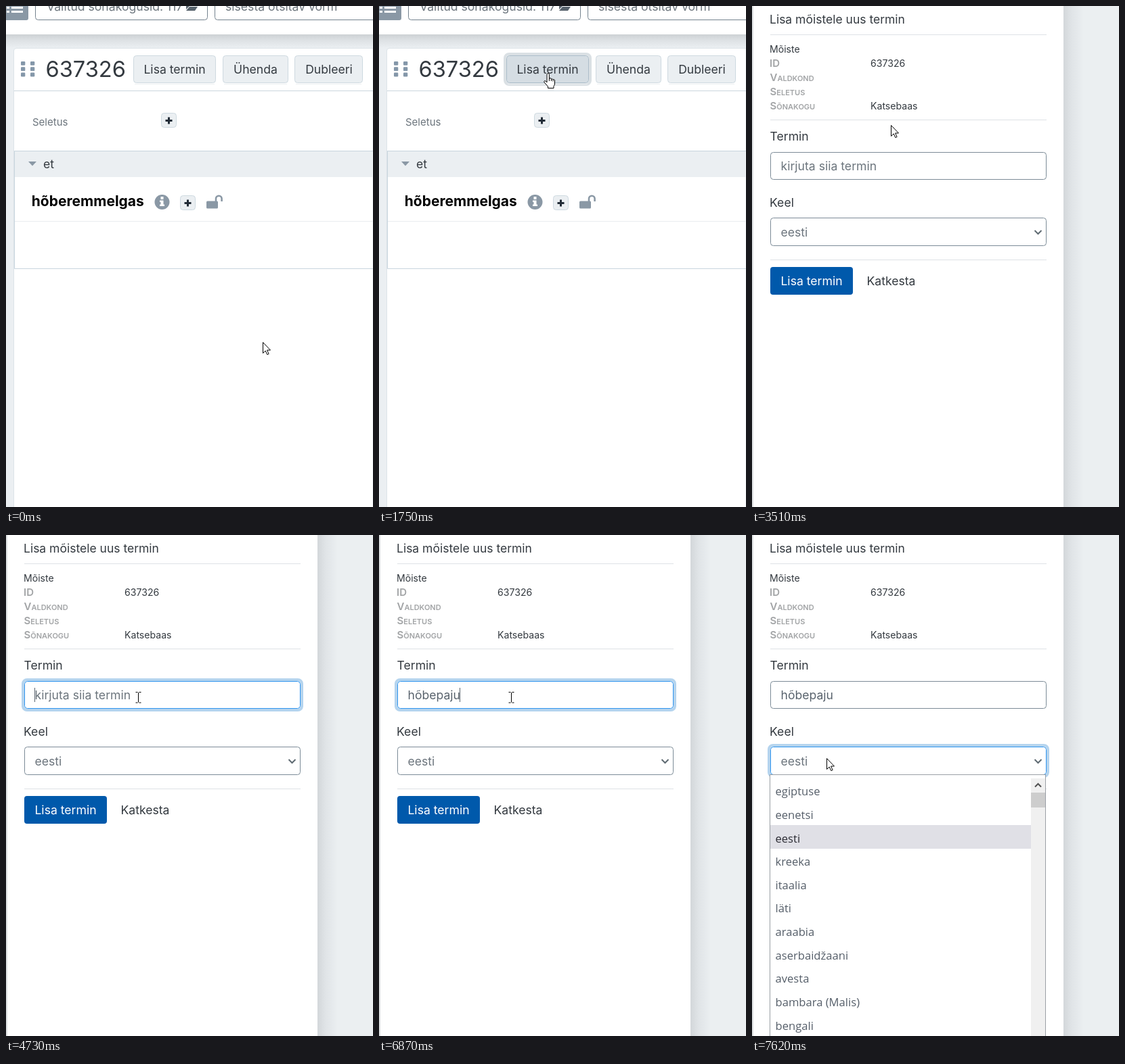
Write an HTML page that moves like this. It is 542 by 741 pixels and loops after 8 s.

```html
<!DOCTYPE html>
<html lang="et">
<head>
<meta charset="utf-8">
<title>Lisa termin</title>
<style>
  html, body { margin: 0; width: 100%; height: 100%; overflow: hidden; background: #ebeff2; }
  svg { display: block; width: 542px; height: 741px; font: 17.6px Inter, sans-serif; fill: #343a40; }
  .muted { fill: #6c757d; }
  .small { font-size: 14.1px; }
  .label { font-size: 15px; font-weight: 600; font-variant: small-caps; fill: #a2a4a6; }
  .mid { text-anchor: middle; }
  .icon { fill: #8a98a5; }
  .btn { fill: #ebeff2; stroke: #ced9e0; }
  .rule { stroke: #dee2e6; }
  .field { fill: #fff; stroke: #7c8b97; }
  .ring { fill: none; stroke: #b5d4ee; stroke-width: 4; }
  .list { font: 16.6px "Open Sans", sans-serif; fill: #555e69; }
</style>
</head>
<body>
<svg viewBox="0 0 542 741">
  <defs>
    <linearGradient id="below" x2="0" y2="1">
      <stop stop-color="#cdd1d4"/><stop offset=".45" stop-color="#dee2e5"/><stop offset="1" stop-color="#ebeff2"/>
    </linearGradient>
    <linearGradient id="beside">
      <stop stop-color="#d3d7da"/><stop offset=".4" stop-color="#e0e4e7"/><stop offset="1" stop-color="#ebeff1"/>
    </linearGradient>
    <g id="plus">
      <rect class="btn" x="-11" y="-11" width="22" height="21" rx="4"/>
      <path d="M-5 0H5M0-5V5" stroke="#212b36" stroke-width="3"/>
    </g>
  </defs>

  <g id="page">
    <rect width="542" height="741" fill="#ebeff2"/>
    <rect y="42" width="542" height="20" fill="url(#below)"/>
    <rect width="542" height="42" fill="#fff"/>
    <rect x="-6" y="-20" width="39" height="41" rx="3" class="icon"/>
    <path d="M1 2.500h4M1 8.500h4M8 2.500h17M8 8.500h17" stroke="#fff" stroke-width="3"/>
    <g fill="#fff" stroke="#74828e">
      <rect x="43.500" y="-20.500" width="254" height="41" rx="4"/>
      <rect x="308.500" y="-20.500" width="300" height="41" rx="4"/>
    </g>
    <text class="muted" x="60" y="7">Valitud sõnakogusid: 117</text>
    <path d="M266 5V-4h13v4h-8zM266 7l5-6h12l-4 6z" fill="#58636d"/>
    <text class="muted" x="324" y="7">sisesta otsitav vorm</text>

    <path d="M11.500 741V67q0-4.500 4.500-4.500H542V741" fill="#fff" stroke="#dce3e8"/>
    <g id="grip" fill="#8497a9"></g>
    <text x="58.500" y="105" font-size="32.600">637326</text>
    <rect id="hoverRing" class="ring" x="186" y="71" width="126" height="45" rx="6" style="stroke:#dae0e4"/>
    <path d="M190 115.500h118M322 115.500h93M428 115.500h97" stroke="#eceff1"/>
    <rect id="addButton" class="btn" x="188.500" y="73.500" width="121" height="40" rx="4"/>
    <rect class="btn" x="320.500" y="73.500" width="96" height="40" rx="4"/>
    <rect class="btn" x="426.500" y="73.500" width="100" height="40" rx="4"/>
    <g class="mid">
      <text x="249" y="100">Lisa termin</text>
      <text x="368.500" y="100">Ühenda</text>
      <text x="477" y="100">Dubleeri</text>
    </g>
    <path d="M12 125.500H542" stroke="#cbd6dd"/>
    <text class="muted" x="39" y="177" font-size="15">Seletus</text>
    <use href="#plus" x="240.500" y="169.500"/>

    <rect x="12" y="214" width="530" height="39" fill="#ebeff2"/>
    <path d="M542 214.500H12.500V388.500H542" fill="none" stroke="#c8d5de"/>
    <path d="M13 318.500H542" stroke="#e9edf0"/>
    <path class="icon" d="M33 230h12l-6 6.500z"/>
    <text x="55" y="240">et</text>
    <text x="37.800" y="296" font-size="21" font-weight="700" fill="#000">hõberemmelgas</text>
    <circle class="icon" cx="230.500" cy="290" r="11"/>
    <path d="M227 287.500h5.500v6h1.500v2.500h-7v-2.500h1.500v-3.500H227zM228.500 282h4v4h-4z" fill="#fff"/>
    <use href="#plus" x="268.500" y="291.500"/>
    <rect class="icon" x="296" y="288.500" width="17" height="11" rx="1.500"/>
    <path d="M310 289v-4a4.300 4.300 0 0 1 8.600 0v4" fill="none" stroke="#8a98a5" stroke-width="2.600"/>
  </g>

  <g id="panel">
    <rect width="542" height="741" fill="#ebeff1"/>
    <rect width="2" height="741" fill="#dadddf"/>
    <rect x="460" width="30" height="741" fill="url(#beside)"/>
    <rect x="2" width="458" height="741" fill="#fff"/>
    <path class="rule" d="M27 42.500H435M27 168.500H435M27 375.500H435"/>
    <text x="26" y="26" font-size="17.500">Lisa mõistele uus termin</text>
    <g class="small">
      <text x="26" y="69">Mõiste</text>
      <text x="175" y="90">637326</text>
      <text x="175" y="153">Katsebaas</text>
    </g>
    <g class="label">
      <text x="26" y="90">ID</text>
      <text x="26.500" y="111">Valdkond</text>
      <text x="26.500" y="132">Seletus</text>
      <text x="26.500" y="153">Sõnakogu</text>
    </g>
    <text x="26.500" y="199">Termin</text>
    <rect id="inputRing" class="ring" x="25" y="214" width="412" height="45" rx="6"/>
    <rect id="input" class="field" x="27.500" y="216.500" width="407" height="40" rx="4"/>
    <text id="hint" class="muted" x="42.500" y="243">kirjuta siia termin</text>
    <text id="typed" x="42.500" y="243" fill="#59636d"></text>
    <rect id="caret" y="226" width="1" height="21" fill="#59636d"/>

    <text x="26" y="297">Keel</text>
    <rect id="selectRing" class="ring" x="25" y="311" width="412" height="46" rx="6"/>
    <rect id="select" class="field" x="27.500" y="313.500" width="407" height="41" rx="4"/>
    <text class="muted" x="42.500" y="341">eesti</text>
    <path d="M417.500 332l5 5 5-5" fill="none" stroke="#5f6a72" stroke-width="2"/>

    <rect x="27" y="386" width="122" height="41" rx="4" fill="#0059ab"/>
    <text class="mid" x="88" y="413" fill="#fff">Lisa termin</text>
    <text x="169.500" y="413">Katkesta</text>

    <g id="popup">
      <rect x="26.500" y="354.500" width="407" height="400" fill="#fff" stroke="#9a9fa5"/>
      <rect x="27" y="429" width="385" height="35" fill="#e0e0e6"/>
      <rect x="412" y="360" width="21" height="381" fill="#f0f0f0"/>
      <rect x="412" y="381" width="21" height="22" fill="#cdcdcd"/>
      <path d="M418 372.500l4.500-4.500 4.500 4.500" fill="none" stroke="#505050" stroke-width="2"/>
      <g id="list" class="list"></g>
    </g>
  </g>

  <g id="cursor">
    <path id="arrow" d="M.5.5V16.500L4.200 13l2.600 5.600 2.300-1L6.600 12H11.500Z" fill="#fff" stroke="#000"/>
    <path id="hand" transform="translate(-7)" fill="#fff" stroke="#000"
      d="M5 14V2.300a1.700 1.700 0 0 1 3.400 0V9a1.500 1.500 0 0 1 3 .4a1.500 1.500 0 0 1 2.600.8a1.400 1.400 0 0 1 2.500.8V16q0 2-1.500 3.500V22.500H6.500V20L1 13.800q-.8-1.700.9-2.200 1.200 0 3.100 2.400ZM8.400 9v3M11.400 9.400V12M14 10.200V12.500"/>
    <path id="beam" d="M-3.500-7.500h3M1.500-7.500h3M.5-7V7.500M-3.500 8h3M1.500 8h3" fill="none" stroke="#000"/>
  </g>
</svg>

<script>
  const LOOP = 8000;
  const $ = id => document.getElementById(id);
  const show = (id, on) => $(id).style.display = on ? '' : 'none';
  const fade = (id, value) => $(id).style.opacity = value;

  // Last row whose start time has passed.
  const at = (rows, t) => rows.filter(row => row[0] <= t).pop();

  const pointer = [
    [0, 379, 497, 'arrow'], [70, 354, 400, 'arrow'], [140, 318, 250, 'arrow'],
    [210, 292, 150, 'arrow'], [280, 281, 117, 'arrow'],
    [480, 268, 109, 'hand'], [550, 257, 103, 'hand'], [620, 251, 99, 'hand'], [690, 250, 99, 'hand'],
    [2360, 248, 99, 'arrow'], [2960, 239, 88, 'arrow'], [3030, 229, 76, 'arrow'], [3100, 224, 71, 'arrow'],
    [3510, 205, 176, 'arrow'], [3580, 190, 229, 'beam'], [3650, 184, 272, 'arrow'],
    [3720, 181, 290, 'arrow'], [3790, 183, 278, 'arrow'], [3860, 188, 252, 'beam'],
    [3930, 193, 244, 'beam'], [4000, 195, 240, 'beam'],
    [7130, 180, 252, 'beam'], [7200, 148, 294, 'arrow'], [7270, 122, 322, 'arrow'], [7340, 110, 330, 'arrow']
  ];
  const hoverFill = [[0, '#ebeff2'], [480, '#e2e8ec'], [550, '#d9e0e6'], [620, '#d5dde3'], [1490, '#ccd6dd'], [1750, '#d5dde3']];
  const hoverLine = [[0, '#ced9e0'], [480, '#bccad4'], [620, '#adbeca']];
  const hoverRing = [[0, 0], [1490, .4], [1560, .8], [1620, 1]];
  const inputFocus = [[0, 0], [4200, .5], [4270, 1], [7480, .4], [7550, 0]];
  const selectFocus = [[0, 0], [7480, .5], [7550, 1]];
  const word = 'hõbepaju';
  const keyTimes = [4860, 5190, 5540, 5740, 5880, 6010, 6140, 6270];
  const caretStart = 4730, caretEnd = 7480, blink = 535;
  const languages = ['egiptuse', 'eenetsi', 'eesti', 'kreeka', 'itaalia', 'läti', 'araabia',
    'aserbaidžaani', 'avesta', 'bambara (Malis)', 'bengali'];

  $('list').innerHTML = languages.map((name, i) =>
    `<text x="34.5" y="${385.2 + i * 34.65}"${i === 2 ? ' fill="#2b2b33"' : ''}>${name}</text>`).join('');
  $('grip').innerHTML = [0, 1, 2, 3, 4, 5].map(i =>
    `<rect x="${22 + i % 2 * 14}" y="${82 + (i >> 1) * 8.3}" width="6.3" height="5.8" rx="1.2"/>`).join('');

  function focusField(name, amount) {
    fade(name + 'Ring', amount);
    $(name).style.stroke = amount === 0 ? '' : amount < 1 ? '#5691c4' : '#3095ee';
  }

  function draw(t) {
    const inPanel = t >= 2360;
    show('page', !inPanel);
    show('panel', inPanel);

    const [, x, y, shape] = at(pointer, t);
    $('cursor').setAttribute('transform', `translate(${x} ${y})`);
    ['arrow', 'hand', 'beam'].forEach(id => show(id, id === shape));

    $('addButton').style.fill = at(hoverFill, t)[1];
    $('addButton').style.stroke = at(hoverLine, t)[1];
    fade('hoverRing', at(hoverRing, t)[1]);

    focusField('input', at(inputFocus, t)[1]);
    focusField('select', at(selectFocus, t)[1]);
    show('popup', t >= 7550);

    const count = keyTimes.filter(time => time <= t).length;
    $('typed').textContent = word.slice(0, count);
    show('hint', count === 0);
    const blinkOn = Math.floor((t - caretStart) / blink) % 2 === 0;
    show('caret', t >= caretStart && t < caretEnd && blinkOn);
    const width = count && inPanel ? $('typed').getComputedTextLength() : 0;
    $('caret').setAttribute('x', Math.floor(42.5 + width));
  }

  const start = performance.now();
  function tick() {
    draw((performance.now() - start) % LOOP);
    requestAnimationFrame(tick);
  }
  tick();
</script>
</body>
</html>
```
